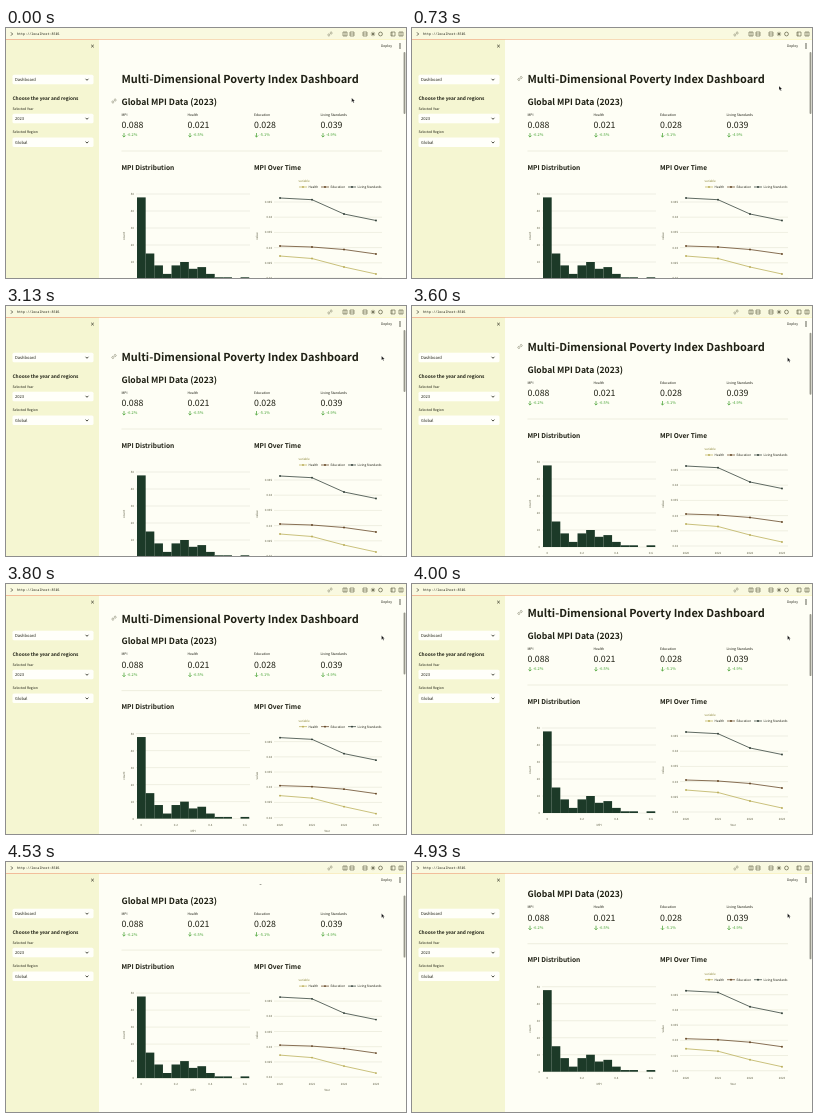
An HTML page that plays this animation: 400x250 px, repeating every 4.99 s.

```html
<!DOCTYPE html>
<html lang="en">
<head>
<meta charset="utf-8">
<title>Dashboard</title>
<style>
  html, body { margin: 0; width: 100%; height: 100%; overflow: hidden; background: #fefef5; }
  svg { display: block; width: 100vw; height: 100vh; }
  text {
    font-family: "Noto Sans CJK JP", "Noto Sans CJK SC", "Noto Sans CJK", sans-serif;
    text-rendering: geometricPrecision;
    white-space: pre;
  }
  .mono { font-family: "Noto Sans Mono", monospace; }
</style>
</head>
<body>
<svg id="stage" viewBox="0 0 400 250"></svg>
<script>
const LOOP = 4990;
const INK = '#1f2014', MUTED = '#5c5c42', PAGE = '#fefef5', SIDE = '#f5f6d2';
const GRID = '#dfdfcd', GREEN = '#3f9f2c', BAR = '#1c3a28';

// y is the middle of the capital letters
const text = (x, y, size, str, attrs = '') =>
  `<text x="${x}" y="${y + size * 0.37}" font-size="${size}" fill="${INK}" ${attrs}>${str}</text>`;
const rect = (x, y, w, h, fill, attrs = '') =>
  `<rect x="${x}" y="${y}" width="${w}" height="${h}" fill="${fill}" ${attrs}/>`;
const path = (d, stroke, width = 0.6, attrs = '') =>
  `<path d="${d}" fill="none" stroke="${stroke}" stroke-width="${width}" ${attrs}/>`;
const bold = 'font-weight="700"';
const middle = 'text-anchor="middle"', end = 'text-anchor="end"';
const tick = (x, y, str, anchor = middle) =>
  text(x, y, 2.9, str, `${anchor} style="fill:${MUTED}"`);
const sideways = (x, y, str) =>
  text(0, 0, 3, str, `${middle} transform="translate(${x} ${y}) rotate(-90)" style="fill:${MUTED}"`);
const link = (x, y, id) =>
  `<g id="${id}" transform="translate(${x} ${y}) rotate(-40)">` +
  path('M-.5 -1H-1.5A1 1 0 0 0 -1.5 1H-.5M.5 -1H1.5A1 1 0 0 1 1.5 1H.5M-1.2 0H1.2', '#7c7c66', 0.55) + '</g>';

function metrics() {
  return [
    [115.5, 'MPI', '0.088', '-6.2%'],
    [181.5, 'Health', '0.021', '-6.5%'],
    [248, 'Education', '0.028', '-5.1%'],
    [314.5, 'Living Standards', '0.039', '-4.9%']
  ].map(([x, label, value, delta]) =>
    text(x, 86.5, 3.4, label) +
    text(x, 97, 8.8, value) +
    path(`M${x + 2.5} 105V109M${x + 0.9} 107.5L${x + 2.5} 109.1L${x + 4.1} 107.5`, GREEN, 0.7) +
    text(x + 5.5, 107, 3.9, delta, `style="fill:${GREEN}"`)
  ).join('');
}

function histogram() {
  const base = 251, unit = 1.7, left = 131, step = 8.63;
  let out = '';
  for (let n = 0; n <= 50; n += 10) {
    const y = base - n * unit;
    out += path(`M130 ${y}H244`, GRID, 0.5) + tick(128, y, n, end);
  }
  [48, 15, 8, 3, 8, 10, 6, 7, 3, 1, 1, 0, 1].forEach((n, i) => {
    out += rect(left + i * step, base - n * unit, step + 0.05, n * unit, BAR);
  });
  ['0', '0.2', '0.4', '0.6'].forEach((s, i) => { out += tick(135.3 + i * 34.5, 257, s); });
  return out + tick(187, 263, 'MPI') + sideways(118, 208, 'count');
}

function lineChart() {
  const xs = [274, 306, 338, 370];
  const series = [
    ['Health', '#b9ac55', [228, 230.5, 239, 246], 293],
    ['Education', '#60401f', [218, 219, 221.5, 226], 315],
    ['Living Standards', '#2b3a33', [170, 171.7, 186, 192.5], 342]
  ];
  let out = '';
  for (let i = 0; i < 6; i++) {
    const y = 174 + i * 15.2;
    out += path(`M268 ${y}H376`, GRID, 0.5) + tick(266, y, +(0.045 - i * 0.005).toFixed(3), end);
  }
  out += text(292.5, 153, 3, 'variable', 'style="fill:#8b8436"');
  for (const [name, color, ys, x] of series) {
    const dot = (cx, cy) => `<circle cx="${cx}" cy="${cy}" r=".9" fill="${color}"/>`;
    out += path('M' + xs.map((px, i) => `${px} ${ys[i]}`).join('L'), color, 0.75);
    out += xs.map((px, i) => dot(px, ys[i])).join('');
    out += path(`M${x} 159H${x + 8}`, color, 0.7) + dot(x + 4, 159);
    out += text(x + 9.5, 159, 3.1, name);
  }
  xs.forEach((x, i) => { out += tick(x, 257, 2020 + i); });
  return out + tick(321, 263, 'Year') + sideways(251, 208, 'value');
}

const content =
  text(115.5, 51, 10.95, 'Multi-Dimensional Poverty Index Dashboard', bold) +
  text(115.5, 73.4, 8.6, 'Global MPI Data (2023)', bold) +
  link(108, 50.5, 'titleLink') + link(108, 73, 'subtitleLink') +
  metrics() + path('M115.5 123H376', '#dcdcc6', 0.5) +
  text(115.5, 139.3, 6.6, 'MPI Distribution', bold) +
  text(248, 139.3, 6.6, 'MPI Over Time', bold) +
  histogram() + lineChart();

const select = (y, value) =>
  rect(6.5, y - 4.8, 81, 9.6, '#fffffa', 'rx="1.6"') + text(9, y, 4.1, value) +
  path(`M79.6 ${y - 0.7}L81 ${y + 0.8}L82.4 ${y - 0.7}`, INK, 0.8);

const sidebar =
  rect(0, 11, 93, 239, SIDE) +
  path('M85.2 16.8L87.8 19.4M87.8 16.8L85.2 19.4', INK, 0.65) +
  select(51.5, 'Dashboard') +
  text(6.5, 70, 4.75, 'Choose the year and regions', bold) +
  text(6.5, 81, 3.4, 'Selected Year') + select(90.5, '2023') +
  text(6.5, 104, 3.4, 'Selected Region') + select(114.3, 'Global');

const box = x => `M${x - 2} 4H${x + 2}V8H${x - 2}Z`;
const header =
  rect(93, 10, 307, 12, PAGE) +
  text(375, 18, 3.4, 'Deploy') +
  [16, 18, 20].map(y => `<circle cx="394" cy="${y}" r=".65" fill="${INK}"/>`).join('') +
  rect(0, 0, 400, 11, '#f9f9e0') +
  '<linearGradient id="accent"><stop stop-color="#f0a080"/><stop offset="1" stop-color="#f8f6b8"/></linearGradient>' +
  rect(0, 11, 400, 0.7, 'url(#accent)') +
  path('M5 4.4L6.6 6L5 7.6', INK, 0.7) +
  text(11, 6, 3.4, 'http://localhost:8501', 'class="mono"') +
  link(324, 6, 'urlLink') +
  path(`${box(339)}M339 4V8${box(346)}M344 6H348${box(359)}M357 6H361${box(387)}M386 4V8`, MUTED, 0.6) +
  path('M367 3.8V8.2M364.8 6H369.2M365.5 4.5L368.5 7.5M368.5 4.5L365.5 7.5', MUTED, 0.6) +
  path('M372.6 6A1.9 1.9 0 1 1 376.4 6A1.9 1.9 0 1 1 372.6 6Z', MUTED, 0.7) +
  path(`${box(395)}M395 4V8`, MUTED, 0.6);

const stage = document.getElementById('stage');
stage.innerHTML =
  rect(0, 0, 400, 250, PAGE) + `<g id="content">${content}</g>` + sidebar + header +
  rect(397.6, 24, 1.8, 62, '#96968a', 'id="thumb" rx=".9"') +
  '<path id="cursor" d="M0 0V4.2L1 3.3L1.8 4.9L2.5 4.6L1.8 3.1H3.1Z" fill="#111" stroke="#fff" stroke-width=".25"/>';

const [page, thumb, cursor, titleLink, subtitleLink] =
  ['content', 'thumb', 'cursor', 'titleLink', 'subtitleLink'].map(id => document.getElementById(id));

// Straight-line interpolation through [time, value] keys
function track(keys, t) {
  const i = keys.findIndex(([time]) => time > t);
  if (i === 0) return keys[0][1];
  if (i < 0) return keys[keys.length - 1][1];
  const [t0, a] = keys[i - 1], [t1, b] = keys[i];
  return a + (b - a) * (t - t0) / (t1 - t0);
}

const SCROLL = [[3400, 0], [3470, 3], [3600, 10], [3930, 20.5], [4000, 22], [4270, 29],
  [4470, 35], [4730, 40.5], [4800, 40.5], [4930, 42]];
const CURSOR_X = [[0, 345.7], [270, 363], [470, 363], [530, 367], [670, 367], [1130, 375.5]];
const CURSOR_Y = [[0, 70], [270, 63], [470, 63], [530, 58], [670, 58], [1130, 45],
  [2870, 45], [3130, 51.5]];

function draw(t) {
  const scroll = track(SCROLL, t);
  page.setAttribute('transform', `translate(0 ${-scroll})`);
  thumb.setAttribute('y', 24 + scroll * 0.275);
  cursor.setAttribute('transform', `translate(${track(CURSOR_X, t)} ${track(CURSOR_Y, t)})`);
  subtitleLink.style.display = t < 530 ? '' : 'none';
  titleLink.style.display = t >= 530 && t < 4200 ? '' : 'none';
}

const start = performance.now();
function frame() {
  const t = (performance.now() - start) % LOOP;
  draw(Math.floor((t + 1) * 0.015) / 0.015);
  requestAnimationFrame(frame);
}
draw(0);
frame();
</script>
</body>
</html>
```
